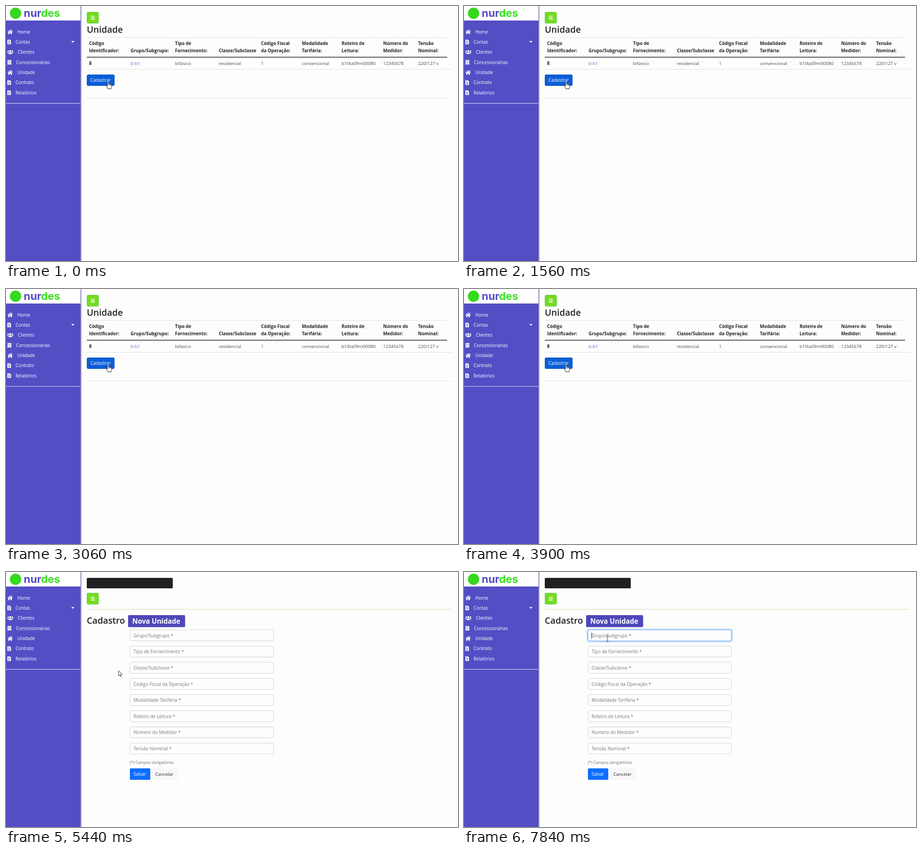
Write an HTML page that moves like this. It is 996 px wide and 562 px high and loops after 8 s.

```html
<!DOCTYPE html>
<html lang="pt">
<head>
<meta charset="utf-8">
<title>Unidade</title>
<style>
html, body { margin: 0; width: 100%; height: 100%; overflow: hidden; background: #fdfdfc; }
svg { display: block; width: 996px; height: 562px; }
text { font-family: "Open Sans", "Noto Sans", sans-serif; white-space: pre; }
</style>
</head>
<body>
<svg id="stage" viewBox="0 0 996 562" xmlns="http://www.w3.org/2000/svg">
  <defs>
    <linearGradient id="shade">
      <stop offset="0" stop-color="#9a9aa8"/>
      <stop offset="1" stop-color="#fdfdfc"/>
    </linearGradient>
    <g id="home">
      <path d="M-6 .3 0-5l2.8 2.5V-4.6h1.5v3.4L6 .3l-.8.9L0-3.4-5.2 1.2Z"/>
      <path d="M-4 1.2 0-2.3 4 1.2V5H1.2V2h-2.4v3H-4Z"/>
    </g>
    <g id="file">
      <path d="M-4-5H1.6L4-2.6V5h-8Z"/>
      <path d="M-2.4-2.8H.6M-2.4-.2h4.8M-2.4 2.4h4.8" stroke="#544ec5" stroke-width="1.1"/>
    </g>
    <g id="users">
      <circle cy="-2.3" r="2.2"/><circle cx="-4.6" cy="-2.4" r="1.5"/><circle cx="4.6" cy="-2.4" r="1.5"/>
      <path d="M-3.7 4.3V2.6Q-3.5.6 0 .6t3.7 2v1.7ZM-6.6 2V.8Q-6.3-.4-4.4-.4q1 0 1.4.5Q-4.3.7-4.5 2ZM6.6 2V.8Q6.3-.4 4.4-.4q-1 0-1.4.5Q4.3.7 4.5 2Z"/>
    </g>
    <g id="tower">
      <path d="M-4-5h8v9h.6v1h-9.2V4H-4Z"/>
      <path d="M-1.5-3.4v4.8M1.5-3.4v4.8" stroke="#544ec5" stroke-width="1.5" stroke-dasharray="1.4 1"/>
      <path d="M-1 2.4h2V4h-2Z" fill="#544ec5"/>
    </g>
    <g id="toggle">
      <rect x="178.5" y=".5" width="25.5" height="24.5" rx="2.5" fill="#74dc1e" stroke="#62cc5c"/>
      <path d="M187 9.5h8.6M187 12.8h8.6M187 16.1h8.6" stroke="#fff" stroke-width="1.6"/>
    </g>
  </defs>
  <rect width="996" height="562" fill="#fdfdfc"/>
  <rect x="164" width="4" height="562" fill="url(#shade)"/>
  <rect width="164.5" height="562" fill="#544ec5"/>
  <rect width="164" height="32" fill="#fff"/>
  <circle cx="21" cy="16" r="12.5" fill="#35d91d"/>
  <text x="39" y="24" font-size="23.5" font-weight="700" style="font-family:Inter,sans-serif" fill="#5549c9">nur<tspan fill="#35e01c">des</tspan></text>
  <path d="M0 214.5H164" stroke="#e6e4fa"/>
  <path d="M143.8 77.3h7l-3.5 3.6Z" fill="#fff"/>
  <g id="menu" fill="#fff"></g>

  <g id="list">
    <use href="#toggle" y="13"/>
    <path d="M178 69.5H972M178 139.5H983" stroke="#dedfe6"/>
    <path d="M178 202.5H983" stroke="#e2e2f5"/>
    <path d="M178 112.7H972" stroke="#212126" stroke-width="1.5"/>
    <rect x="178.5" y="151.5" width="60.3" height="24" rx="2.5" fill="#0b5ed7" stroke="#0a56c6"/>
  </g>

  <g id="form">
    <use href="#toggle" y="46"/>
    <rect x="178" y="13" width="189.5" height="23" rx="2" fill="#1f2022"/>
    <path d="M178 82.3H982" stroke="#e2e6c4" stroke-width="1.6"/>
    <rect x="269" y="95" width="125.7" height="26.5" rx="2.5" fill="#4f48b9"/>
    <rect x="273" y="432.7" width="45" height="25.3" rx="2.5" fill="#0d6efd"/>
    <rect x="321" y="432.7" width="57.5" height="25.3" rx="2.5" fill="#f7f7f9"/>
    <g id="fields"></g>
    <rect id="glow" x="272" y="126.4" width="318.5" height="26.8" rx="4" fill="none" stroke="#b4d3fe" stroke-width="3"/>
    <rect id="focus" x="273.3" y="127.7" width="315.8" height="24.2" rx="2.8" fill="none" stroke="#86b7fe"/>
    <path id="caret" d="M281.4 133.5V147" stroke="#222"/>
  </g>

  <g id="hand">
    <path d="M-1.3 1Q0-.8 1.3 1V5.6Q2.6 4.6 3.6 6 5 5.2 5.8 6.7 7.6 6.2 7.8 8v3.4Q7.6 13 6.6 14.4V16H-.8V14.8L-4.2 10Q-4.8 8.2-3.2 8.3L-1.3 10Z" fill="#fff" stroke="#15151a" stroke-width="1"/>
    <path d="M1.3 5.6V8.6M3.6 6V8.8M5.8 6.7V9" stroke="#15151a" stroke-width=".7"/>
  </g>
  <path id="arrow" d="M0 0V11.4L2.7 8.9 4.4 13 6.3 12.2 4.6 8.2H8Z" fill="#fff" stroke="#15151a" stroke-width=".9"/>
  <path id="beam" d="M-2.5-6.5Q0-6.5 0-5.3 0-6.5 2.5-6.5M0-5.3V5.3M-2.5 6.5Q0 6.5 0 5.3 0 6.5 2.5 6.5" fill="none" stroke="#33333a" stroke-width="1"/>
</svg>
<script>
const LOOP = 8000, SWAP = 4480, BEAM = 6960, FOCUS = 7440;
const $ = id => document.getElementById(id);

function add(parent, tag, attrs, text) {
  const el = document.createElementNS("http://www.w3.org/2000/svg", tag);
  for (const k in attrs) el.setAttribute(k, attrs[k]);
  if (text) el.textContent = text;
  return parent.appendChild(el);
}
const label = (parent, x, y, text, size, fill, weight = 400) =>
  add(parent, "text", { x, y, "font-size": size, fill, "font-weight": weight }, text);

// Side menu: icon, icon x, text x, text
[
  ["home", 9, 25, "Home"], ["file", 7, 21, "Contas"], ["users", 9.5, 26, "Clientes"],
  ["tower", 7.5, 22, "Concessionárias"], ["home", 9, 25, "Unidade"],
  ["file", 7, 21, "Contrato"], ["file", 7, 21, "Relatórios"]
].forEach(([icon, ix, tx, text], i) => {
  const y = 57 + i * 22.35;
  add($("menu"), "use", { href: "#" + icon, x: ix, y });
  label($("menu"), tx, y + 3.7, text, 9.9, "#fff");
});

// Table columns: x, heading lines, value
const list = $("list");
label(list, 178, 59, "Unidade", 19.6, "#212529", 600);
[
  [183, "Código", "Identificador:", "8"],
  [274.5, "", "Grupo/Subgrupo:", "b-b1"],
  [372.5, "Tipo de", "Fornecimento:", "bifasico"],
  [469, "", "Classe/Subclasse", "residencial"],
  [562, "Código Fiscal", "da Operação:", "1"],
  [652, "Modalidade", "Tarifária:", "convencional"],
  [739.5, "Roteiro de", "Leitura:", "b10ta09m00080"],
  [831, "Número do", "Medidor:", "12345678"],
  [908, "Tensão", "Nominal:", "220/127 v"]
].forEach(([x, top, bottom, value], i) => {
  if (top) label(list, x, 86.4, top, 9.85, "#212529", 700);
  label(list, x, 102.4, bottom, 9.85, "#212529", 700);
  label(list, x, 130.3, value, 9.85, i == 1 ? "#5a6fd0" : i ? "#45484d" : "#212529", i ? 400 : 700);
});
label(list, 186, 167, "Cadastrar", 9.87, "#fff");

const form = $("form"), fields = $("fields");
label(form, 178, 113.5, "Cadastro", 19.5, "#212529", 600);
label(form, 278.3, 114, "Nova Unidade", 15.05, "#fff", 700);
["Grupo/Subgrupo", "Tipo de Fornecimento", "Classe/Subclasse", "Código Fiscal da Operação",
 "Modalidade Tarifária", "Roteiro de Leitura", "Número do Medidor", "Tensão Nominal"
].forEach((name, i) => {
  const y = 127.6 + i * 35.64;
  add(fields, "rect", { x: 273.3, y, width: 315.8, height: 24.2, rx: 2.8, fill: "#fefefe", stroke: "#d0d1dc" });
  label(fields, 281, y + 16, name + " *", 10.05, "#70767d");
});
label(form, 273, 423, "(*) Campos obrigatórios", 8.7, "#666b72");
label(form, 281, 449.2, "Salvar", 9.9, "#fff");
label(form, 329, 449.2, "Cancelar", 9.86, "#212529");

// Pointer path: time, x, y
const path = [
  [0, 225, 166.5], [4900, 225, 166.5], [5440, 248, 217.5], [5740, 251, 234],
  [6320, 316, 157], [6560, 316, 157], [6740, 315.3, 153.3], [6900, 315.3, 153.3],
  [7120, 316, 147], [LOOP, 316, 147]
];
function pointer(t) {
  const i = path.findIndex(p => p[0] > t);
  const [t0, x0, y0] = path[i - 1], [t1, x1, y1] = path[i];
  const u = (t - t0) / (t1 - t0), e = u * u * (3 - 2 * u);
  return `translate(${x0 + (x1 - x0) * e} ${y0 + (y1 - y0) * e})`;
}
const show = (id, on) => $(id).setAttribute("display", on ? "inline" : "none");

function draw(t) {
  show("list", t < SWAP);
  show("form", t >= SWAP);
  show("hand", t < SWAP);
  show("arrow", t >= SWAP && t < BEAM);
  show("beam", t >= BEAM);
  for (const id of ["hand", "arrow", "beam"]) $(id).setAttribute("transform", pointer(t));
  const lit = Math.max(0, Math.min(1, (t - FOCUS) / 150));
  $("glow").setAttribute("opacity", lit);
  $("focus").setAttribute("opacity", lit);
  show("caret", t >= FOCUS);
}
function tick() {
  draw(performance.now() % LOOP);
  requestAnimationFrame(tick);
}
tick();
</script>
</body>
</html>
```
